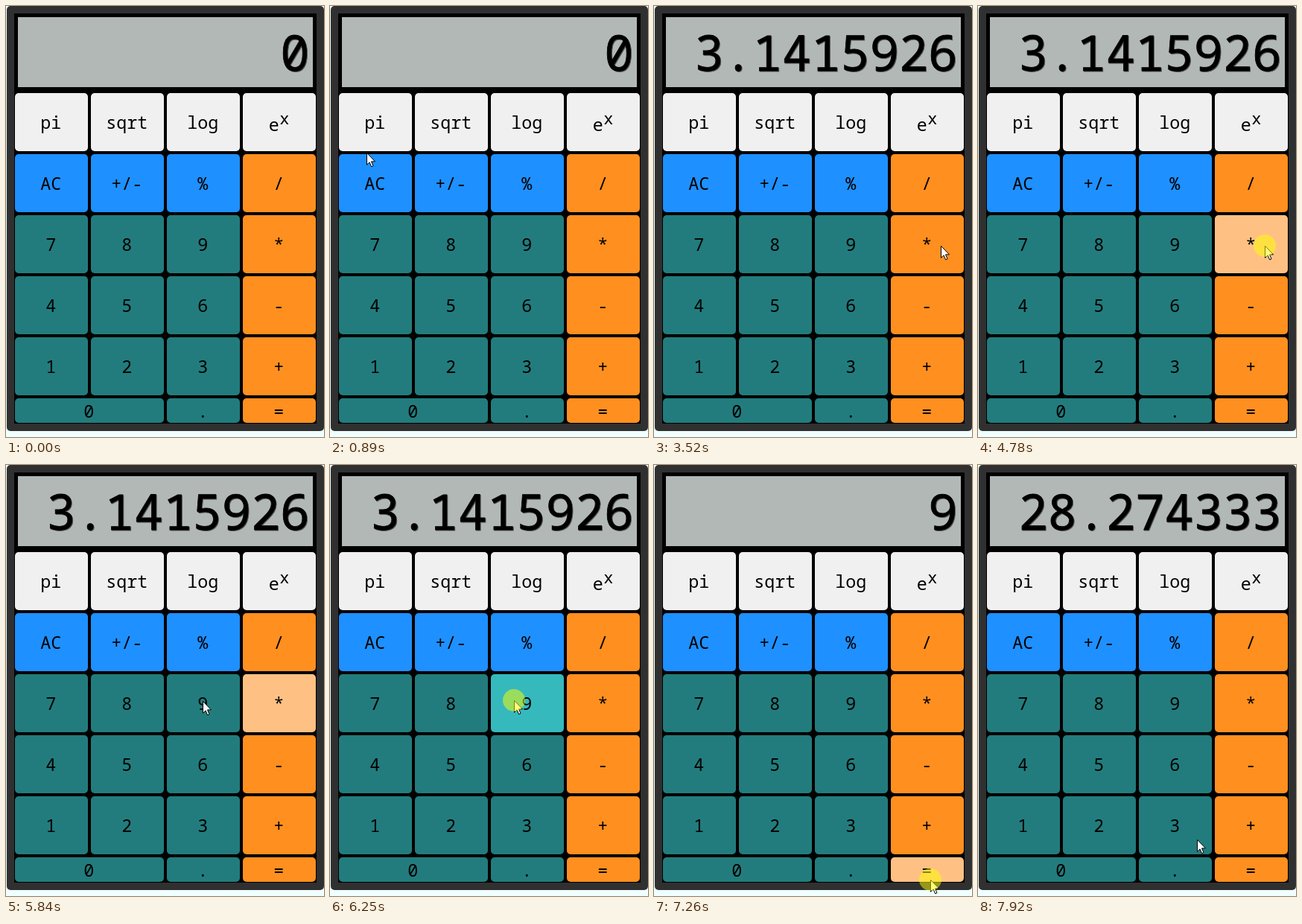
Recreate the animation shown at these times as an HTML page. Size 427x579 px, loop 7.99 s.

```html
<!DOCTYPE html>
<html lang="en">
<head>
<meta charset="utf-8">
<title>Calculator</title>
<style>
  html, body { margin: 0; width: 100%; height: 100%; overflow: hidden; background: #f0ffff; }
  svg { display: block; }
  text { font-family: "Noto Sans Mono", "DejaVu Sans Mono", monospace; font-size: 23.4px; text-anchor: middle; }
  #display {
    font-size: 65.4px; text-anchor: end; stroke: #000; stroke-width: .8px;
    filter: drop-shadow(1.5px 1.5px .5px rgba(0, 0, 0, .55));
  }
</style>
</head>
<body>
<svg width="427" height="579" viewBox="0 0 427 579">
  <rect x="1" width="426" height="571" rx="5" fill="#303030"/>
  <rect x="11" y="10" width="406" height="551"/>
  <rect x="16" y="15" width="396" height="94" fill="#b2b8b6"/>
  <text id="display" x="407.5" y="86.5"></text>
  <g id="keys"></g>
  <path id="cursor" d="M.5 .5V16.3L4.1 12.9 6.6 18.8 9 17.8 6.5 11.9H11.5Z" fill="#fff" stroke="#000"/>
  <circle id="halo" r="15" fill="#ff0" fill-opacity=".5"/>
</svg>
<script>
const LOOP = 7990, STEP = 68, PRESS = 200;
const WHITE = "#f0f0f0", BLUE = "#1e90ff", TEAL = "#227c7d", ORANGE = "#ff8f1f";
const LIT = { [TEAL]: "#35b9bd", [ORANGE]: "#ffc183" };
const ROWS = ["pi sqrt log ex", "AC +/- % /", "7 8 9 *", "4 5 6 -", "1 2 3 +", "0 . ="];

// Each move follows a curve from one point to another, bent towards "via".
const MOVES = [
  { start: 290, steps: 2, from: [477, 678], to: [45, 334] },
  { start: 680, steps: 7, from: [45, 334], via: [-47, 225], to: [66, 191] },
  { start: 1490, steps: 2, from: [66, 191], to: [63, 165] },
  { start: 2750, steps: 3, from: [63, 165], to: [298, 353], leaves: true },
  { start: 3520, steps: 1, from: [385, 322], to: [385, 322] },
  { start: 5770, steps: 4, from: [385, 322], to: [247, 316] },
  { start: 6650, steps: 7, from: [247, 316], via: [458, 559], to: [371, 557] },
  { start: 7920, steps: 1, from: [371, 557], to: [294, 503] }
];

// A held key stays lit until the next click.
const CLICKS = [
  { start: 1820, key: "pi", result: "3.1415926" },
  { start: 4780, key: "*", result: "3.1415926", held: true },
  { start: 6250, key: "9", result: "9" },
  { start: 7260, key: "=", result: "28.274333" }
];

const $ = id => document.getElementById(id);
const keys = {};

function add(tag, attrs, label) {
  const el = document.createElementNS("http://www.w3.org/2000/svg", tag);
  for (const name in attrs) el.setAttribute(name, attrs[name]);
  if (label) el.textContent = label;
  $("keys").append(el);
  return el;
}

function addKey(label, row, col, span) {
  const last = row === 5;
  const x = 12 + col * 102, y = 117 + row * 82;
  const width = span * 102 - 4, height = last ? 33 : 78;
  const fill = row === 0 ? WHITE : col === 3 ? ORANGE : row === 1 ? BLUE : TEAL;
  keys[label] = { fill, rect: add("rect", { x, y, width, height, rx: 5, fill }) };
  const mid = x + width / 2 - .7, base = y + (last ? 25.5 : 48);
  if (label === "ex") {
    add("text", { x: mid - 6.5, y: base + 2.5 }, "e");
    add("text", { x: mid + 7.5, y: base - 6.5, style: "font-size:22px" }, "x");
  } else {
    add("text", { x: mid, y: base }, label);
  }
}

ROWS.forEach((line, row) => {
  let col = 0;
  for (const label of line.split(" ")) {
    const span = label === "0" ? 2 : 1;
    addKey(label, row, col, span);
    col += span;
  }
});

const latest = (list, t) => list.findLast(item => item.start <= t);

function pointerAt(t) {
  const move = latest(MOVES, t);
  if (!move) return null;
  const { start, steps, from, to, via, leaves } = move;
  const step = 1 + Math.floor((t - start) / STEP);
  if (leaves && step > steps) return null;
  const s = 1 - (1 - Math.min(step / steps, 1)) ** 3;
  return from.map((a, i) => {
    const b = via ? via[i] : (a + to[i]) / 2;
    return Math.round((1 - s) ** 2 * a + 2 * s * (1 - s) * b + s * s * to[i]);
  });
}

function draw(t) {
  const click = latest(CLICKS, t);
  const pressing = click && t < click.start + PRESS;
  const litKey = click && (pressing || click.held) && click.key;
  const shown = latest(CLICKS, t - PRESS);
  const pos = pointerAt(t);

  $("cursor").style.display = pos ? "" : "none";
  $("halo").style.display = pressing ? "" : "none";
  if (pos) {
    for (const id of ["cursor", "halo"]) $(id).setAttribute("transform", `translate(${pos})`);
  }
  $("display").textContent = shown ? shown.result : "0";
  for (const label in keys) {
    const { rect, fill } = keys[label];
    rect.setAttribute("fill", label === litKey && LIT[fill] || fill);
  }
}

function tick() {
  draw(performance.now() % LOOP);
  requestAnimationFrame(tick);
}
tick();
</script>
</body>
</html>
```
